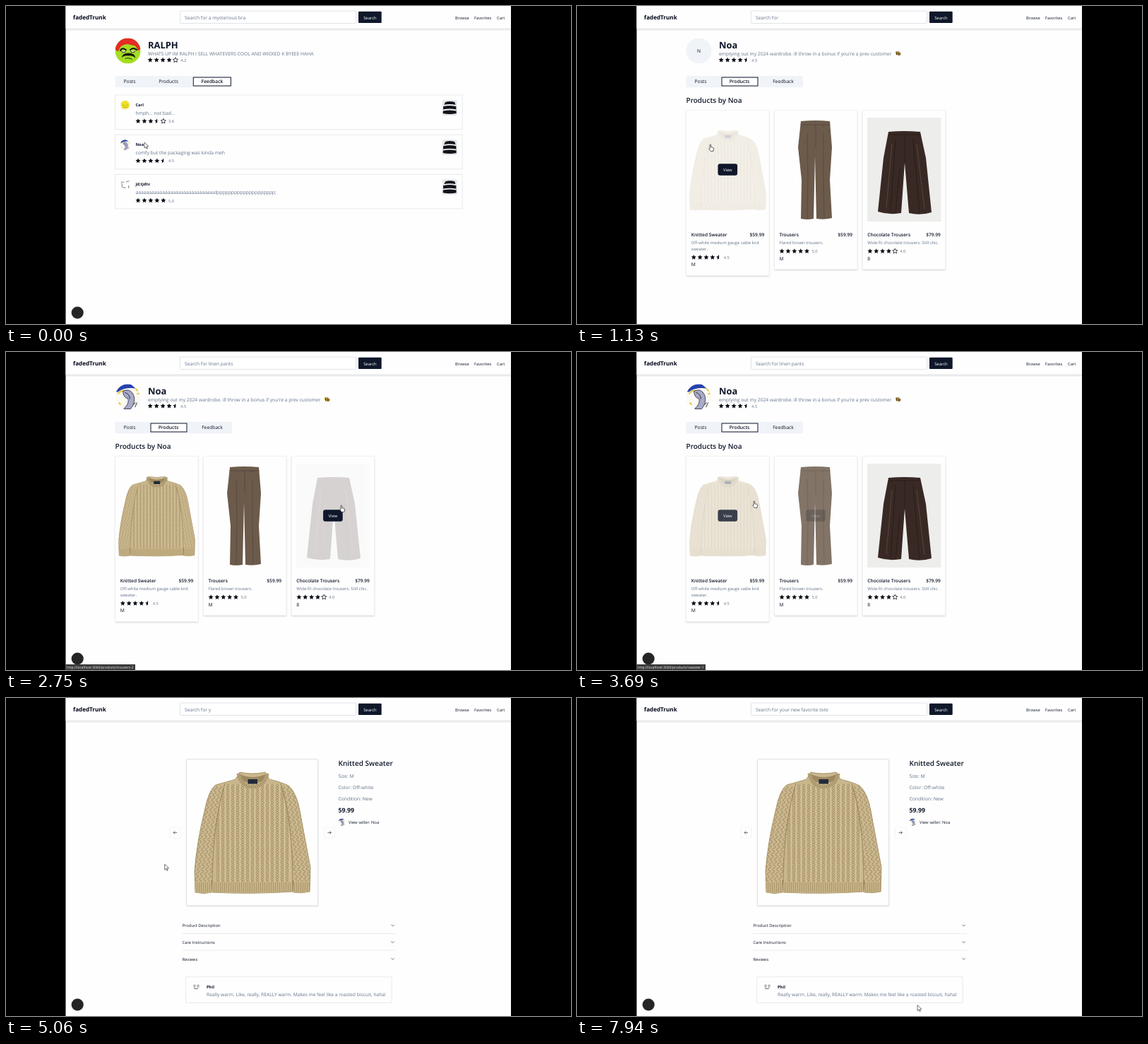
Animation, 800 px wide and 450 px high, one loop 8 s. Source, as an HTML page:

```html
<!DOCTYPE html>
<html lang="en">
<head>
<meta charset="utf-8">
<title>Shop walkthrough</title>
<style>
html, body { margin: 0; width: 100%; height: 100%; overflow: hidden; background: #000; }
svg { display: block; width: 800px; height: 450px; }
text { font-family: "Open Sans", "Noto Sans", sans-serif; text-rendering: geometricPrecision; white-space: pre; }
</style>
</head>
<body>
<svg id="stage" viewBox="0 0 800 450" xmlns="http://www.w3.org/2000/svg"></svg>
<script>
const LOOP = 8000, INK = '#0f172a', GREY = '#64748b', LINE = '#e5e7eb';
const BODY = 6.72, SMALL = 5.85;

const rect = (x, y, w, h, fill, extra = '') =>
  `<rect x="${x}" y="${y}" width="${w}" height="${h}" fill="${fill}" ${extra}/>`;
const path = (d, fill = 'none', extra = '') => `<path d="${d}" fill="${fill}" ${extra}/>`;
const text = (x, y, s, size = BODY, fill = INK, weight = 400, extra = '') =>
  `<text x="${x}" y="${y}" font-size="${size}" fill="${fill}" font-weight="${weight}" ${extra}>${s}</text>`;
const use = (id, x, y, scale = 1) =>
  `<use href="#${id}" transform="translate(${x} ${y}) scale(${scale})"/>`;
const group = (id, content, extra = '') => `<g id="${id}" ${extra}>${content}</g>`;
const MID = 'text-anchor="middle"', END = 'text-anchor="end"';
const outline = (color, width) => `stroke="${color}" stroke-width="${width}"`;

function starPath() {
  const points = [];
  for (let i = 0; i < 10; i++) {
    const a = i * Math.PI / 5, r = i % 2 ? 1.75 : 3.7;
    points.push((Math.sin(a) * r).toFixed(2) + ' ' + (-Math.cos(a) * r).toFixed(2));
  }
  return 'M' + points.join('L') + 'Z';
}

function stars(x, y, score, step = 8.95) {
  let out = '';
  for (let i = 0; i < 5; i++) {
    const left = score - i;
    const id = left >= 1 ? 'star' : left >= 0.5 ? 'half' : left >= 0.3 || score < i + 0.3 ? 'hollow' : 'half';
    out += use(id, x + i * step, y);
  }
  return out + text(x + 5 * step - 1.8, y + 2.4, score.toFixed(1), 5.7, GREY);
}

// Knitwear
const wave = (x, y, n, a, h) =>
  `M${x} ${y}` + `q${a} ${h / 2} 0 ${h}q${-a} ${h / 2} 0 ${h}`.repeat(n);

function sweater() {
  const shape = 'M331 105Q349 109 367 105L373 115Q390 119 400 124Q412 135 416 160L431 240L430 274Q418 277 407 275L406 259L406 274Q349 278 292 275L292 259L291 275Q280 278 268 275L267 245Q270 205 281 160Q287 130 297 123Q315 118 325 115Z';
  const torso = 'M310 121L325 115L373 115L389 121Q406 175 406 262H292Q293 175 310 121Z';
  let cables = '', light = '', left = '', right = '';
  for (let x = 300; x < 404; x += 7) {
    cables += wave(x, 122, 20, 4, 3.5) + wave(x, 122, 20, -4, 3.5);
    light += wave(x + 3.5, 122, 18, 2, 4);
  }
  for (let i = 0; i < 5; i++) {
    left += wave(272 + i * 6, 125, 20, 4, 3.5);
    right += wave(400 + i * 6, 125, 20, 4, 3.5);
  }
  const stitch = outline('#907b52', 1);
  return `<clipPath id="knit">${path(shape)}</clipPath><clipPath id="torso">${path(torso)}</clipPath>` +
    group('sweater', path(shape, '#cbb88f', outline('#a99567', 1)) +
      '<g clip-path="url(#knit)">' +
      path(left, 'none', stitch + ' opacity=".6" transform="translate(84 0) skewX(-12) translate(-38 0)"') +
      path(right, 'none', stitch + ' opacity=".6" transform="translate(-46 0) skewX(11) translate(8 0)"') +
      path(torso, '#c9b68d') +
      `<g clip-path="url(#torso)">${path(cables, 'none', stitch + ' opacity=".55"')}${path(light, 'none', outline('#e2d3ae', 1) + ' opacity=".7"')}</g>` +
      path('M310 121Q293 175 292 260M389 121Q406 175 406 260', 'none', outline('#927d53', 1.2) + ' opacity=".7"') +
      path('M267 268H431', 'none', outline('#c6b287', 16)) +
      path('M267 268H431', 'none', outline('#a28d61', 14) + ' stroke-dasharray="1 2" opacity=".7"') +
      path('M291.500 258V278M406.500 258V278', 'none', outline('#75623f', 1)) + '</g>' +
      path('M332 108Q349 116 367 108L366 116Q349 125 333 116Z', '#9d8960') +
      path('M329 107Q333 125 349 126Q366 125 370 107', 'none', outline('#bda97d', 5)) +
      path('M329 107Q333 125 349 126Q366 125 370 107', 'none', outline('#94815a', 5) + ' stroke-dasharray=".8 1.8"') +
      rect(342.5, 115, 13.5, 6.5, '#202a3a'));
}

const trousers = path('M317 163Q338 161 358 163L361 200L358 246L361 300Q350 303 339 301L337 213L335 301Q326 303 317 301L318 246L313 200Z', '#6c5b4b') +
  path('M316.500 168H358.500M338 168V200M346 169H350M326 180Q328 240 326 300M349 180Q348 240 350 300', 'none', outline('#51443a', .7));

const chocolate = rect(411, 158, 104.5, 147, '#ededec') +
  path('M441 178Q463 176 486 178L494 215L502 292Q486 297 470 293L464 222L459 293Q442 296 426 291L434 215Z', '#392924') +
  path('M441 182H486M464 182V222M451 188L444 292M476 188L485 293M457 230L451 293', 'none', outline('#261a17', .8)) +
  path('M446 195L438 286M481 196L492 287', 'none', outline('#514039', 1.3));

const defs = '<defs>' +
  path(starPath(), '#080c14', 'id="star"') +
  path(starPath(), '#fff', 'id="hollow" ' + outline('#080c14', .8)) +
  `<clipPath id="leftSide">${rect(-5, -5, 5.4, 10, '#000')}</clipPath>` +
  path(starPath(), '#080c14', 'id="half" clip-path="url(#leftSide)"') +
  '<clipPath id="round"><circle r="18"/></clipPath>' +
  '<filter id="soft" x="-10%" y="-10%" width="120%" height="120%"><feGaussianBlur stdDeviation="1"/></filter>' +
  sweater() +
  group('green', rect(-18, -18, 36, 36, '#a4dd20') +
    path('M-18 -2V-18H18V-2L14 0Q12 -9 6 -8Q-3 -12 -10 -6L-14 1Z', '#e52c28') +
    path('M-11 0Q-8 -6 -2 -1M3 -1Q8 -6 13 -1', 'none', outline('#111', 2)) +
    path('M-9 0a3 2 0 1 0 6 0M4 0a3 2 0 1 0 6 0', '#fff', outline('#111', 1)) +
    path('M-9 10Q-8 3 1 3Q10 3 11 10Q6 6 1 7Q-5 6 -9 10Z', '#171b10') +
    path('M-4 11Q1 9 6 12', 'none', outline('#37511b', 1.2)), 'clip-path="url(#round)"') +
  group('lilac', rect(-18, -18, 36, 36, '#faf9f3') +
    path('M-18 -7Q-13 -20 4 -18L11 -12Q-4 -14 -14 -7Z', '#2742ad') +
    path('M-14 -4Q-11 -9 -4 -9M11 -12L14 -8M13 -4L16 -5M-13 8L-10 11', 'none', outline('#e8c943', 2)) +
    path('M-7 -8Q3 -13 8 -3Q12 7 4 17H-6Q3 9 0 2Q-6 2 -7 -8Z', '#a9aac7', outline('#47485f', 1)) +
    path('M-4 -6Q2 -5 3 3M8 11L11 8M10 15L13 8', 'none', outline('#333', 1)), 'clip-path="url(#round)"') +
  group('yellow', rect(-18, -18, 36, 36, '#f7f6ef') +
    path('M-15 -5Q-9 -18 6 -15Q18 -6 13 7Q1 17 -12 9Z', '#f1df24') +
    path('M-9 0H-2M4 -1H10M-5 8Q2 3 8 8', 'none', outline('#8f8638', 1.5)), 'clip-path="url(#round)"') +
  group('doodle', path('M-14 -8Q-7 -11 -4 -7M3 -9L14 -12M-13 -5Q-9 0 -11 10M12 3V13M-8 10L2 11', 'none', outline('#444', 1.7))) +
  group('shirt', rect(-10.5, -11, 21, 22, '#e5e7eb', 'rx="2"') +
    path('M-6 -8Q0 -10 7 -8L9 -2L9.500 8Q0 10 -9.500 8L-9 -2Z', '#11141a') +
    path('M-9 -3Q0 -5 9 -3M-9.500 3.500Q0 1.500 9.500 3.500', 'none', outline('#f4f4f4', 1.8))) +
  group('bee', '<ellipse cx="-2" cy="-2" rx="1.800" ry="1.300" fill="#b8c4cc"/><ellipse cx="1" cy="-2.500" rx="1.300" ry="1.800" fill="#cbd5db"/>' +
    '<ellipse rx="3.700" ry="2.500" fill="#d9a72b" transform="rotate(25)"/>' +
    path('M-1.500 -2.500L-2 2M1 -2L.5 2.500M3 -1L2.600 2.500', 'none', outline('#2d2418', 1))) +
  '</defs>';

const header = rect(84.5, 0, 630.5, 450, '#fefefe') +
  rect(84.5, 32, 630.5, 2, '#000', 'opacity=".12" filter="url(#soft)"') +
  rect(84.5, 0, 630.5, 32, '#fefefe') + rect(84.5, 31.7, 630.5, .7, '#dcdfe4') +
  text(95, 19, 'fadedTrunk', 8.1, '#020617', 700) +
  rect(246.5, 7, 249, 17.5, '#fff', outline('#dfe4ec', 1) + ' rx="1"') +
  text(253, 18.9, '', BODY, GREY, 400, 'id="query"') +
  rect(499, 7.7, 32.7, 16.3, INK, 'rx="1"') + text(515.4, 18.5, 'Search', 5.9, '#fff', 400, MID) +
  text(636, 18.6, 'Browse', 5.75) + text(663, 18.6, 'Favorites', 5.75) + text(695, 18.6, 'Cart', 5.75);

function profile(name, bio, score, active) {
  const tabs = [['Posts', 175, 155, 40], ['Products', 230, 205, 51], ['Feedback', 292, 265.3, 53]];
  return text(201, 59.6, name, 12.9, INK, 700) + text(201, 69.7, bio, BODY, GREY) + stars(204.2, 76.5, score) +
    rect(154.5, 99, 165.5, 16.3, '#f0f3f8', 'rx="1.500"') +
    tabs.map(([label, mid, x, w], i) =>
      (i === active ? rect(x, 101, w, 12, '#fff', outline(INK, 1)) : '') +
      text(mid, 109.4, label, BODY, INK, i === active ? 600 : 400, MID)).join('');
}

function feedbackRow(i, avatar, name, words, score) {
  return `<g transform="translate(0 ${i * 56.1})">` +
    rect(154.5, 126, 491.7, 48.7, '#fefefe', outline(LINE, .9)) + use(avatar, 168.8, 140.5, .41) +
    text(183.5, 141.8, name, 5.7, INK, 700) + text(183.5, 154.2, words, 6.78, GREY) +
    stars(187, 163, score) + use('shirt', 628.2, 144) + '</g>';
}

function productCard(i, title, price, lines, score, size, picture) {
  const x = 154.7 + i * 124.8, shift = lines.length > 1 ? 8.8 : 0;
  const h = 225.3 + shift;
  return rect(x, 148.5, 117.3, h, '#000', 'opacity=".2" filter="url(#soft)"') + rect(x, 147.5, 117.3, h, '#fefefe', outline('#f0f1f3', .6)) +
    group('pic' + i, picture) +
    group('view' + i, rect(x + 44.8, 223.2, 27.6, 16.5, INK, 'rx="3"') + text(x + 58.6, 233.6, 'View', 5.9, '#fff', 400, MID)) +
    text(x + 7, 325.7, title, 6.6, INK, 600) + text(x + 110.5, 325.7, price, 6.6, INK, 600, END) +
    lines.map((s, n) => text(x + 7, 337.1 + n * 8.6, s, 5.92, GREY)).join('') +
    stars(x + 10.6, 346.9 + shift, score, 8.85) + text(x + 7, 359.6 + shift, size);
}

const feedback = profile('RALPH', 'WHATS UP IM RALPH I SELL WHATEVERS COOL AND WICKED K BYEEE HAHA', 4.2, 2) +
  use('green', 172.5, 63.5) +
  feedbackRow(0, 'yellow', 'Carl', 'hmph... not bad...', 3.6) +
  feedbackRow(1, 'lilac', 'Noa', 'comfy but the packaging was kinda meh', 4.5) +
  feedbackRow(2, 'doodle', 'jd;tjdtv', 'a'.repeat(30) + 'l' + 'p'.repeat(20) + ';', 5);

const letterAvatar = (x, y, r, s) => `<circle cx="${x}" cy="${y}" r="${r}" fill="#f0f3f8"/>` + text(x, y + 2.4, s, BODY, INK, 400, MID);

const products = profile('Noa', 'emptying out my 2024 wardrobe. ill throw in a bonus if you\'re a prev customer', 4.5, 1) +
  use('bee', 454.5, 67.2) + group('sellerLetter', letterAvatar(172.5, 63.5, 18, 'N')) + group('sellerFace', use('lilac', 172.5, 63.5)) +
  text(154.5, 136.8, 'Products by Noa', 10, INK, 600) +
  productCard(0, 'Knitted Sweater', '$59.99', ['Off-white medium gauge cable knit', 'sweater.'], 4.5, 'M', use('sweater', -16.3, 107, .6585)) +
  productCard(1, 'Trousers', '$59.99', ['Flared brown trousers.'], 5, 'M', trousers) +
  productCard(2, 'Chocolate Trousers', '$79.99', ['Wide-fit chocolate trousers. Still chic.'], 4, '8', chocolate);

const arrowButton = (x, d) => rect(x - 7.5, 183, 15, 15, '#fefefe', outline('#f0f2f5', .8) + ' rx="1"') +
  path(`M${x - 2.5 * d} 190.500H${x + 2.3 * d}m${-2 * d} -2.200l${2.2 * d} 2.200l${-2.2 * d} 2.200`, 'none', outline('#444b58', .8));

const detail = rect(255.5, 87.5, 186.5, 207.500, '#000', 'opacity=".12" filter="url(#soft)"') +
  rect(255.5, 86.5, 186, 207.3, '#fefefe', outline('#dfe3e8', 1) + ' rx="1"') +
  group('photo', use('sweater', 0, 0)) + arrowButton(239.5, -1) + arrowButton(458, 1) +
  text(470.5, 96.1, 'Knitted Sweater', 10, INK, 600) +
  ['Size: M', 'Color: Off-white', 'Condition: New'].map((s, i) => text(470.5, 112.7 + i * 16, s, 6.78, GREY)).join('') +
  text(470.5, 162.4, '59.99', 8.8, INK, 700) + use('lilac', 475.6, 175.8, .29) + text(485, 178.4, 'View seller: Noa', SMALL) +
  ['Product Description', 'Care Instructions', 'Reviews'].map((s, i) => {
    const y = 322 + i * 23.6;
    return text(249.5, y + 2.4, s, SMALL) + path(`M545.400 ${y - 1.2}l2.200 2.200l2.200 -2.200`, 'none', outline('#4b5361', .8)) +
      (i < 2 ? rect(249, y + 11, 303, .8, LINE) : '');
  }).join('') +
  rect(254.7, 394.7, 291.5, 36.5, '#fefefe', outline(LINE, .9)) +
  group('guestLetter', letterAvatar(269.3, 409.5, 7.5, 'P')) +
  group('guestFace', path('M265.500 406.500h3M270.500 406.500h3M265.500 408.500q1.500 1 3 0M270.500 408.500q1.500 1 3 0M266 411q3 1 6 0', 'none', outline('#555', .9))) +
  text(284, 411, 'Phil', 5.75, INK, 700) +
  text(284, 421.5, 'Really warm. Like, really, REALLY warm. Makes me feel like a roasted biscuit, haha!', 6.7, GREY);

const overlay = group('badge', '<circle cx="101.200" cy="434" r="9" fill="#000" opacity=".15"/><circle cx="101.200" cy="434" r="8.500" fill="#252525"/>') +
  group('status', rect(84.5, 442, 98.5, 8, '#3b3b3b', 'id="statusBox"') + text(86, 448, '', 4.9, '#f1f1f1', 400, 'id="link"')) +
  group('cursor',
    group('arrow', path('M0 0V8L1.900 6.300L3.200 9.200L4.500 8.600L3.200 5.900L5.800 5.700Z', '#fff', outline('#333', .7))) +
    group('hand', path('M-.9 5.400V.8a.8.8 0 0 1 1.600 0V3.800L3.700 4.400Q4.700 4.700 4.500 5.800L4 9.400H.2L-2.300 6.200Q-1.900 5 -.9 5.900Z', '#fff', outline('#222', .7))) +
    group('beam', path('M-1.700 -3.800H1.700M0 -3.800V3.800M-1.700 3.800H1.700', 'none', outline('#333', .8))));

const stage = document.getElementById('stage');
stage.innerHTML = defs + header + group('feedback', feedback) + group('products', products) + group('detail', detail) + overlay;

const parts = {};
stage.querySelectorAll('[id]').forEach(el => parts[el.id] = el);
const show = (id, on) => parts[id].setAttribute('display', on ? 'inline' : 'none');
const clamp = v => Math.max(0, Math.min(1, v));
const at = (steps, t) => steps.filter(s => s[0] <= t).pop();

const OPEN_SHOP = 700, OPEN_DETAIL = 4200;
const trail = [
  [0, 196, 193], [250, 196, 193], [600, 189, 196], [1700, 189, 196], [1900, 272, 204], [2430, 400, 214],
  [2700, 475, 217], [2950, 475, 217], [3150, 400, 214], [3450, 273, 212], [3650, 251, 211], [4180, 251, 211],
  [4360, 227.5, 210], [4800, 216, 216], [5400, 236, 260], [5700, 252, 314], [6030, 480, 418], [6130, 480, 418],
  [6350, 482, 434.5], [LOOP, 482, 434.5]
];
const pointers = [[0, 'arrow'], [350, 'hand'], [OPEN_DETAIL, 'arrow'], [5960, 'beam'], [6200, 'arrow']];
const hovers = [[[OPEN_SHOP, 1900]], [[1900, 2430], [3150, 3450]], [[2430, 3150]]];
hovers[0].push([3450, 5000]);
const links = [[0, ''], [1250, 'sweater-1'], [1900, 'trousers-1'], [2430, 'trousers-2'], [3150, 'trousers-1'], [3450, 'sweater-1'], [4650, '']];

function query(t) {
  const erase = (s, from) => s.slice(0, Math.max(0, s.length - Math.max(0, Math.floor((t - from) / 40))));
  const type = (s, from) => s.slice(0, Math.max(0, Math.floor((t - from) / 100)));
  if (t < 1000) return erase('a mysterious bra', 30);
  if (t < 4140) return type('linen pants', 1040);
  if (t < 4900) return erase('linen pants', 4140);
  return type('your new favorite tote', 4950);
}

function position(t) {
  const i = trail.findIndex(p => p[0] > t);
  const [t0, x0, y0] = trail[i - 1], [t1, x1, y1] = trail[i];
  const k = (t - t0) / (t1 - t0);
  return [x0 + (x1 - x0) * k, y0 + (y1 - y0) * k];
}

const hover = (i, t) => Math.max(...hovers[i].map(([a, b]) => clamp((Math.min(t, b) - a) / 300) - clamp((t - b) / 300)));

function draw(t) {
  show('feedback', t < OPEN_SHOP);
  show('products', t >= OPEN_SHOP && t < OPEN_DETAIL);
  show('detail', t >= OPEN_DETAIL);
  parts.query.textContent = 'Search for ' + query(t);
  show('sellerLetter', t < 1250);
  show('sellerFace', t >= 1250);
  show('photo', t >= 4500);
  show('guestLetter', t < 4600);
  show('guestFace', t >= 4600);
  show('badge', t < OPEN_SHOP || t >= 1250);
  for (let i = 0; i < 3; i++) {
    const p = clamp(hover(i, t));
    parts['pic' + i].setAttribute('opacity', 1 - .8 * p);
    parts['view' + i].setAttribute('opacity', p);
  }
  const page = at(links, t)[1];
  show('status', page);
  parts.link.textContent = 'http://localhost:3000/products/' + page;
  parts.statusBox.setAttribute('width', page === 'sweater-1' ? 97.5 : 98.5);
  const pointer = at(pointers, t)[1];
  ['arrow', 'hand', 'beam'].forEach(id => show(id, id === pointer));
  parts.cursor.setAttribute('transform', `translate(${position(t)})`);
}

const start = performance.now();
function tick() {
  draw((performance.now() - start) % LOOP);
  requestAnimationFrame(tick);
}
tick();
</script>
</body>
</html>
```
